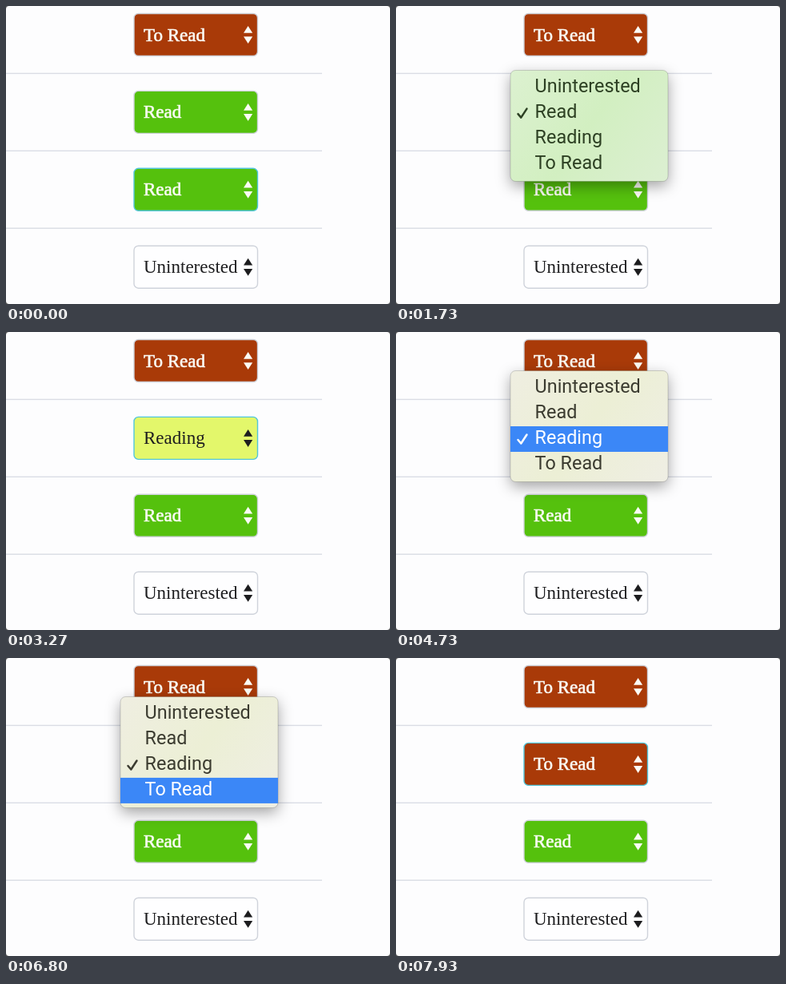
Recreate the animation shown at these times as an HTML page with a canvas. Size 480 by 373 pixels, loop 8000 ms.

```html
<!DOCTYPE html>
<html lang="en">
<head>
<meta charset="utf-8">
<style>
html, body { margin: 0; width: 100%; height: 100%; overflow: hidden; background: #fdfdfe; }
canvas { display: block; }
</style>
</head>
<body>
<canvas width="480" height="373"></canvas>
<script>
const canvas = document.querySelector('canvas');
const ctx = canvas.getContext('2d');
const W = 480, H = 373, LOOP = 8000;
const OPTIONS = ['Uninterested', 'Read', 'Reading', 'To Read'];
const FILLS = [[254, 254, 255], [85, 193, 13], [227, 247, 107], [169, 58, 8]];
const PLAIN = [207, 211, 219], FOCUS = [82, 197, 218];

// Two visits to the menu: every time is in ms within the loop.
const VISITS = [
  { open: 670, move: 1470, blink: 1710, from: 1, to: 2, y: 80.5,
    tint: ['#dcf1d0', '#d2efc1', '#dcefd2'], ink: '#2d4023' },
  { open: 3940, move: 6600, blink: 6850, from: 2, to: 3, y: 48.5,
    tint: ['#efeee1', '#ecefd5', '#efeee4'], ink: '#3b3b30' }
];
const BLINK = 65, FADE_AT = 140, FADE = 260, CHANGE_AT = 410;

const clamp = v => Math.max(0, Math.min(1, v));
const ease = v => { v = clamp(v); return v * v * (3 - 2 * v); };
const mix = (a, b, k) => a.map((v, i) => v + (b[i] - v) * k);
const rgb = c => `rgb(${c.map(Math.round).join(',')})`;

function roundRect(x, y, w, h, r) {
  ctx.beginPath();
  ctx.roundRect(x, y, w, h, r);
}

function triangle(x, base, tip) {
  ctx.beginPath();
  ctx.moveTo(x - 5.6, base);
  ctx.lineTo(x + 5.6, base);
  ctx.lineTo(x, tip);
  ctx.fill();
}

function drawSelect(row, value, fill, focus) {
  const y = 9.5 + row * 96.9, mid = y + 26.5;
  const light = value === 1 || value === 3;
  roundRect(160, y, 154.5, 53, 5.5);
  ctx.fillStyle = rgb(fill);
  ctx.fill();
  ctx.strokeStyle = rgb(mix(PLAIN, FOCUS, focus));
  ctx.lineWidth = 1.4;
  ctx.stroke();

  ctx.font = '23px "Liberation Serif", Times, serif';
  ctx.fillStyle = light ? '#fbfbf5' : '#1d1d1f';
  ctx.fillText(OPTIONS[value], 172, mid + 7.5);
  if (light) {
    ctx.strokeStyle = '#fbfbf5';
    ctx.lineWidth = 0.65;
    ctx.strokeText(OPTIONS[value], 172, mid + 7.5);
  }
  triangle(302.6, mid - 2.2, mid - 11);
  triangle(302.6, mid + 2.2, mid + 11);
}

function drawMenu(visit, t) {
  const fadeStart = visit.blink + FADE_AT;
  if (t < visit.open || t >= fadeStart + FADE) return;
  const x = 143, w = 197, h = 139, { y } = visit;
  const blinking = t >= visit.blink && t < visit.blink + BLINK;
  const active = blinking ? -1 : t < visit.move ? visit.from : visit.to;

  ctx.save();
  ctx.globalAlpha = 1 - clamp((t - fadeStart) / FADE);
  const tint = ctx.createLinearGradient(x, y, x + w, y + h);
  visit.tint.forEach((c, i) => tint.addColorStop(i / 2, c));
  ctx.shadowColor = 'rgba(0,0,0,.36)';
  ctx.shadowBlur = 18;
  ctx.shadowOffsetY = 6;
  roundRect(x, y, w, h, 6.5);
  ctx.fillStyle = tint;
  ctx.fill();
  ctx.shadowColor = 'transparent';
  ctx.strokeStyle = 'rgba(0,0,0,.2)';
  ctx.lineWidth = 0.8;
  ctx.stroke();

  ctx.font = '23.4px Roboto, sans-serif';
  OPTIONS.forEach((label, i) => {
    const top = y + 5.7 + i * 31.9;
    if (i === active) {
      ctx.fillStyle = '#3b87f7';
      ctx.fillRect(x, top, w, 32);
    }
    const ink = i === active ? '#fff' : visit.ink;
    ctx.fillStyle = ink;
    ctx.fillText(label, 173.6, top + 22.2);
    if (i === visit.from) {
      ctx.strokeStyle = ink;
      ctx.lineWidth = 2.5;
      ctx.lineCap = ctx.lineJoin = 'round';
      ctx.beginPath();
      ctx.moveTo(152.5, top + 17);
      ctx.lineTo(156.3, top + 21.5);
      ctx.lineTo(163.5, top + 10.5);
      ctx.stroke();
    }
  });
  ctx.restore();
}

function drawPage() {
  ctx.fillStyle = '#fdfdfe';
  ctx.fillRect(0, 0, W, H);
  ctx.fillStyle = '#dadde5';
  for (let i = 0; i < 3; i++) ctx.fillRect(0, 83.7 + i * 96.9, 395, 1.4);
  // Rounded window corners
  ctx.fillStyle = '#555';
  for (const [x, y, sx, sy] of [[0, 0, 1, 1], [W, 0, -1, 1], [0, H, 1, -1], [W, H, -1, -1]]) {
    ctx.beginPath();
    ctx.moveTo(x, y);
    ctx.lineTo(x + 4 * sx, y);
    ctx.quadraticCurveTo(x, y, x, y + 4 * sy);
    ctx.fill();
  }
}

function draw(t) {
  let value = 1, fill = FILLS[1];
  for (const v of VISITS) {
    const since = t - v.blink - CHANGE_AT;
    if (since < 0) continue;
    value = v.to;
    fill = mix(FILLS[v.from], FILLS[v.to], ease(since / 150));
  }
  const focus = ease((t - 600) / 150);
  drawPage();
  drawSelect(0, 3, FILLS[3], 0);
  drawSelect(1, value, fill, focus);
  drawSelect(2, 1, FILLS[1], 1 - focus);
  drawSelect(3, 0, FILLS[0], 0);
  VISITS.forEach(v => drawMenu(v, t));
}

const start = performance.now();
function tick() {
  draw((performance.now() - start) % LOOP);
  requestAnimationFrame(tick);
}
tick();
</script>
</body>
</html>
```
